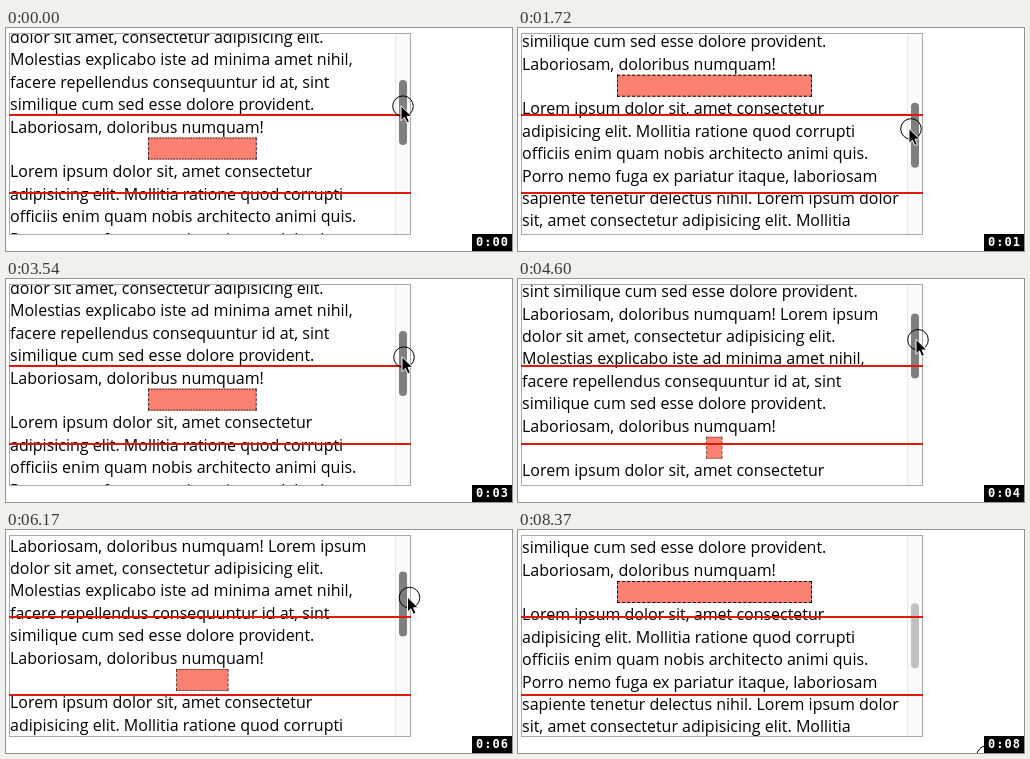
These frames come from a looping animation (506x223 px, 8500 ms). An HTML page:

```html
<!DOCTYPE html>
<html lang="en">
<head>
<meta charset="utf-8">
<title>Scroll-linked box</title>
<style>
  html, body { margin: 0; width: 100%; height: 100%; overflow: hidden; background: #fff; }
  #stage { position: relative; width: 506px; height: 223px; overflow: hidden; }
  #stage div, #cursor { position: absolute; }
  #scroller {
    left: 3px; top: 5px; width: 400px; height: 200px;
    border: 1px solid #a9a9a9; overflow: hidden;
  }
  #content { left: 0; top: 0; width: 385px; }
  #content p {
    position: absolute; left: 0; margin: 0; white-space: pre; color: #000;
    font: 16px/22.4px "Open Sans", "Noto Sans", sans-serif;
  }
  #before { bottom: 0; }
  #after { top: 22.4px; }
  #box {
    left: 95.25px; top: 0; width: 194.5px; height: 22px; box-sizing: border-box;
    background: #fa8072; border: 1px dashed #000;
  }
  #track { left: 385px; top: 0; width: 14px; height: 200px; background: #fafafa; border-left: 1px solid #e8e8e8; }
  #thumb { left: 3px; top: 0; width: 8px; height: 65px; border-radius: 4px; }
  .line { left: 3px; width: 402px; height: 2px; background: #e0180c; }
  #cursor { left: 0; top: 0; overflow: visible; }
  #clock {
    left: 466px; top: 206px; width: 40px; height: 17px; background: #000; color: #fff;
    font: bold 12px/17px "DejaVu Sans Mono", monospace; letter-spacing: 1px;
    text-indent: 4px; white-space: pre;
  }
</style>
</head>
<body>
<div id="stage">
  <div id="scroller">
    <div id="content">
      <p id="before">elit. Molestias explicabo iste ad minima amet
nihil, facere repellendus consequuntur id at,
sint similique cum sed esse dolore provident.
Laboriosam, doloribus numquam! Lorem ipsum
dolor sit amet, consectetur adipisicing elit.
Molestias explicabo iste ad minima amet nihil,
facere repellendus consequuntur id at, sint
similique cum sed esse dolore provident.
Laboriosam, doloribus numquam!</p>
      <div id="box"></div>
      <p id="after">Lorem ipsum dolor sit, amet consectetur
adipisicing elit. Mollitia ratione quod corrupti
officiis enim quam nobis architecto animi quis.
Porro nemo fuga ex pariatur itaque, laboriosam
sapiente tenetur delectus nihil. Lorem ipsum dolor
sit, amet consectetur adipisicing elit. Mollitia
ratione quod corrupti officiis enim quam nobis</p>
    </div>
    <div id="track"><div id="thumb"></div></div>
  </div>
  <div class="line" style="top:86px"></div>
  <div class="line" style="top:164px"></div>
  <svg id="cursor" width="1" height="1">
    <circle r="10.3" fill="none" stroke="#000"/>
    <path d="M-2 -.5V14.5L1.4 11.2L3.8 16.6L6.4 15.5L4.1 10.2H8.8Z" fill="#000" stroke="#fff"/>
  </svg>
  <div id="clock">0:00</div>
</div>
<script>
const LOOP = 8500, LEAVE = 7790, GONE = 8200, PEEK = 8370;
const $ = id => document.getElementById(id);
const content = $('content'), box = $('box'), thumb = $('thumb');
const cursor = $('cursor'), clock = $('clock');

// Top of the box on the stage, and the pointer's x, as [ms, px]
const boxTop = [[0, 109.6], [1310, 44.6], [1630, 44.6], [1720, 46.7], [3540, 109.6],
  [4600, 157.7], [5130, 180], [5430, 180], [6170, 139], [7250, 66.4], [7640, 51], [LOOP, 51]];
const pointerX = [[0, 397], [1310, 393], [1720, 393], [3540, 398], [4600, 400],
  [5130, 400.5], [5430, 400.5], [6170, 403.5], [7250, 402.5], [LOOP, 402.5]];

const clamp = v => Math.max(0, Math.min(1, v));
const slope = (a, b) => (b[1] - a[1]) / (b[0] - a[0]);

function tangent(keys, i) {
  if (i === 0) return slope(keys[0], keys[1]);
  if (i === keys.length - 1) return 0;
  const a = slope(keys[i - 1], keys[i]), b = slope(keys[i], keys[i + 1]);
  return a * b > 0 ? 2 * a * b / (a + b) : 0;
}

// Monotone cubic interpolation
function sample(keys, t) {
  let i = 0;
  while (i < keys.length - 2 && t >= keys[i + 1][0]) i++;
  const [t0, a] = keys[i], [t1, b] = keys[i + 1];
  const d = t1 - t0, u = (t - t0) / d, v = 1 - u;
  return a * v * v * (1 + 2 * u) + b * u * u * (3 - 2 * u)
    + d * u * v * (v * tangent(keys, i) - u * tangent(keys, i + 1));
}

function pointer(t, thumbTop) {
  if (t >= PEEK) return [469, 226];
  const x = sample(pointerX, t), y = thumbTop + 26.2;
  const p = clamp((t - LEAVE) / (GONE - LEAVE));
  const e = p * p * (3 - 2 * p);
  return [x + (459 - x) * e, y + (240 - y) * e];
}

function draw(t) {
  const y = sample(boxTop, t);
  const thumbTop = 52 + (109.6 - y) * 0.362;
  const [px, py] = pointer(t, thumbTop);
  content.style.transform = `translateY(${y - 6}px)`;
  box.style.transform = `scaleX(${clamp((165.9 - y) / 101.4)})`;
  thumb.style.transform = `translateY(${thumbTop - 6}px)`;
  thumb.style.background = t < LEAVE + 60 ? '#7f7f7f' : '#c1c1c1';
  cursor.style.transform = `translate(${px}px, ${py}px)`;
  clock.textContent = '0:0' + Math.floor(t / 1000);
}

const start = performance.now();
function tick() {
  draw((performance.now() - start) % LOOP);
  requestAnimationFrame(tick);
}
tick();
</script>
</body>
</html>
```
